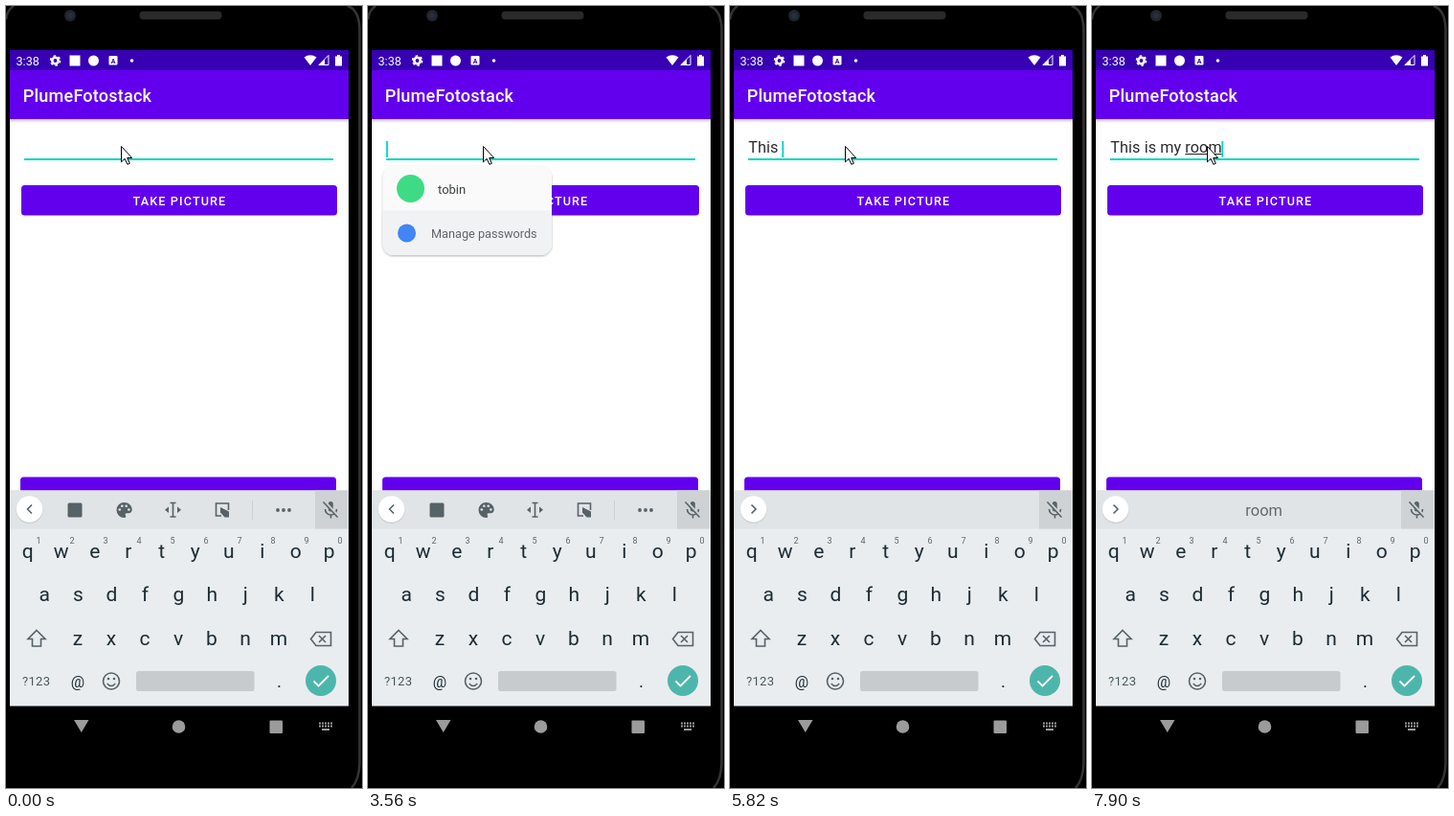
An HTML page for the animation above (8 s loop, 372 by 816 pixels).

```html
<!DOCTYPE html>
<html lang="en">
<head>
<meta charset="utf-8">
<title>Phone typing</title>
<style>
html, body { margin: 0; height: 100%; overflow: hidden; background: #000 }
svg { display: block; width: 372px; height: 816px; font-family: Roboto, sans-serif }
text { white-space: pre }
.mid text, text.mid { text-anchor: middle }
.line { fill: none; stroke: #566268; stroke-width: 1.6 }
.button { font-weight: 500; font-size: 12.64px; letter-spacing: 1.13px; fill: #fff }
</style>
</head>
<body>
<svg viewBox="0 0 372 816">
  <defs>
    <linearGradient id="shade" x2="0" y2="1">
      <stop stop-color="#000" stop-opacity=".22"/><stop offset="1" stop-color="#000" stop-opacity="0"/>
    </linearGradient>
    <filter id="soft" x="-10%" y="-10%" width="120%" height="125%">
      <feDropShadow dx="0" dy="1" stdDeviation="1.3" flood-opacity=".3"/>
    </filter>
  </defs>

  <!-- phone body -->
  <rect width="372" height="816"/>
  <path d="M357 0Q369 4 369.500 24V790Q369 808 361 816M8 0Q1 4 0 14" fill="none" stroke="#343436" stroke-width="2.500"/>
  <circle cx="67" cy="10" r="6" fill="#252527"/>
  <circle cx="67" cy="10" r="3" fill="#20304a"/>
  <rect x="139.500" y="5.500" width="86" height="8.500" rx="4" fill="#2a2a2a"/>

  <!-- app -->
  <rect x="4" y="46" width="354" height="684" fill="#fff"/>
  <rect x="4" y="118" width="354" height="4" fill="url(#shade)"/>
  <rect x="4" y="46" width="354" height="21.500" fill="#3700b3"/>
  <rect x="4" y="67" width="354" height="51" fill="#6200ee"/>
  <g fill="#fff">
    <text x="10.500" y="61.500" font-size="12.600">3:38</text>
    <circle cx="51.500" cy="57" r="3.200" fill="none" stroke="#fff" stroke-width="2.600"/>
    <circle cx="51.500" cy="57" r="5" fill="none" stroke="#fff" stroke-width="1.600" stroke-dasharray="2.500 2.736"/>
    <rect x="66.500" y="51.500" width="11" height="11"/>
    <circle cx="91.500" cy="57" r="5.500"/>
    <rect x="107.500" y="52" width="9" height="9.500" rx="1"/>
    <text class="mid" x="112" y="59.500" font-size="7" font-weight="700" fill="#3700b3">A</text>
    <circle cx="131.500" cy="57" r="1.800"/>
    <path d="M311.500 53.500Q318 49 324.500 53.500L318 62z"/>
    <path d="M327 61.500L337 51.500V61.500z" fill="none" stroke="#fff"/>
    <path d="M326.500 62L333 55.500V62z"/>
    <path d="M344 52.500h2v-1.500h3v1.500h2v10h-7z"/>
    <text x="17.800" y="100" font-size="18.060" font-weight="500" letter-spacing=".2">PlumeFotostack</text>
  </g>
  <rect x="19" y="159" width="323" height="2" fill="#03d5c3"/>
  <text id="field" x="19.300" y="153" font-size="16.200" letter-spacing=".09" fill="#2b2b2b"></text>
  <rect id="under" y="154" height="1.100" fill="#2b2b2b"/>
  <rect id="caret" y="141" width="1.800" height="17" fill="#03d5c3"/>
  <rect x="16" y="187" width="330" height="31.500" rx="3.500" fill="#6200ee"/>
  <text class="button mid" x="181.500" y="208">TAKE PICTURE</text>
  <rect x="15" y="491.500" width="330" height="31" rx="3.500" fill="#6200ee"/>

  <!-- autofill popup -->
  <g id="popup">
    <g filter="url(#soft)">
      <rect x="15.500" y="167" width="176.500" height="93" rx="12" fill="#fafafa"/>
      <path d="M15.500 213.500H192V248a12 12 0 0 1-12 12H27.500a12 12 0 0 1-12-12z" fill="#f1f2f4"/>
    </g>
    <circle cx="44.500" cy="190.500" r="14.500" fill="#3ddc84"/>
    <circle cx="40.500" cy="237" r="9.500" fill="#4285f4"/>
    <text x="73" y="195.500" font-size="13" fill="#3c4043">tobin</text>
    <text x="66" y="241.800" font-size="12.700" fill="#5f6368">Manage passwords</text>
  </g>

  <!-- keyboard -->
  <rect x="4" y="505.500" width="354" height="225" fill="#e9edf0"/>
  <rect x="4" y="505.500" width="354" height="40" fill="#e0e4e6"/>
  <rect x="323" y="505.500" width="34" height="40" fill="#ced2d4"/>
  <circle cx="24.500" cy="526" r="14" fill="#000" opacity=".1"/>
  <circle cx="24.500" cy="525" r="13.700" fill="#fff"/>
  <path id="chevron" class="line" d="M27 520.500l-4.500 4.500 4.500 4.500"/>
  <g id="tools" fill="#566268">
    <rect x="64.500" y="518.500" width="15" height="15" rx="1.500"/>
    <path d="M123.500 518a8 8 0 0 0 0 16c2 0 2-1.500 1.300-2.600-.6-1.200 0-2.200 1.400-2.200h2c2.200 0 3.500-1.600 3.500-3.700 0-4.200-3.700-7.500-8.200-7.500z"/>
    <g fill="#e0e4e6">
      <circle cx="118.800" cy="525.500" r="1.300"/><circle cx="121.300" cy="521.800" r="1.300"/>
      <circle cx="125.700" cy="521.800" r="1.300"/><circle cx="128.300" cy="525.500" r="1.300"/>
    </g>
    <path class="line" d="M171.500 518.500h6M171.500 533h6M174.500 518.500v14.500"/>
    <path d="M170 522.500v6.500l-4-3.250zM179 522.500v6.500l4-3.250z"/>
    <path class="line" d="M225 532h-5.500v-13H232.500v7"/>
    <path d="M224 523l9 4.500v6h-4.500l-4.500-5z"/>
    <rect x="257" y="516" width="1" height="20" fill="#ccd0d3"/>
    <circle cx="284" cy="526" r="1.900"/><circle cx="290" cy="526" r="1.900"/><circle cx="296" cy="526" r="1.900"/>
  </g>
  <text id="hint" class="mid" x="179.700" y="532" font-size="16.500" fill="#62696d"></text>
  <rect x="336.800" y="517" width="5" height="10.500" rx="2.500" fill="#566268"/>
  <path class="line" d="M333.500 525a6 6 0 0 0 12 0M339.500 531v3.500"/>
  <path d="M332.500 517l15 16" stroke="#ced2d4" stroke-width="3"/>
  <path class="line" d="M331.500 517.500l15 16"/>
  <g id="keys" class="mid" font-size="21" fill="#1c2c34"></g>
  <path class="line" d="M32 651.500l9 9h-4.500v7.500h-9v-7.500H23z"/>
  <path class="line" d="M324 653.500h15.500v14H324l-5.500-7zM327 657l7 7M334 657l-7 7"/>
  <text x="17" y="709" font-size="13" letter-spacing=".3" fill="#48565d">?123</text>
  <text class="mid" x="75" y="710.500" font-size="16" fill="#1c2c34">@</text>
  <circle class="line" cx="110" cy="704.500" r="8.500"/>
  <path class="line" d="M105.800 707q4.200 5 8.400 0"/>
  <circle cx="107" cy="702" r="1.300" fill="#566268"/><circle cx="113" cy="702" r="1.300" fill="#566268"/>
  <rect x="136" y="694" width="123.500" height="21" rx="2.500" fill="#c8cbce"/>
  <text class="mid" x="285.500" y="710.500" font-size="19" fill="#1c2c34">.</text>
  <circle cx="329" cy="704" r="16" fill="#4db6ac"/>
  <path d="M321.500 704.500l5 5 10.500-10.500" fill="none" stroke="#fff" stroke-width="1.800"/>

  <!-- navigation -->
  <g fill="#9b9b9b">
    <path d="M71 745h15.500l-7.750 13z"/>
    <circle cx="180.500" cy="752" r="6.800"/>
    <rect x="275.500" y="745.500" width="13.500" height="13.500" rx="1"/>
    <path d="M327 748.500h14M327 751.500h14" stroke="#9b9b9b" stroke-width="2" stroke-dasharray="2 1"/>
    <rect x="330" y="754" width="8" height="2"/>
  </g>

  <path d="M120.500 146.500v16.300l3.700-3.500 2.700 6 2.400-1-2.600-5.800h5z" fill="#fff" stroke="#000"/>
</svg>
<script>
const $ = id => document.getElementById(id);
const LOOP = 8000;
const BLINKS = [0, 670, 1100, 1520, 2050, 2620, 3050, 3440];
// time, text, toolbar shown
const TYPING = [
  [0, '', true], [4700, 'T'], [4820, 'Th'], [5320, 'Thi'], [5570, 'This'], [5820, 'This '],
  [5970, 'This ', true], [6090, 'This i'], [6210, 'This is'], [6330, 'This is '],
  [6450, 'This is ', true], [6880, 'This is m'], [7130, 'This is my'], [7250, 'This is my '],
  [7370, 'This is my ', true], [7510, 'This is my r'], [7630, 'This is my ro'],
  [7750, 'This is my roo'], [7900, 'This is my room']
];
// time, opacity, scale
const POPUP = [[0, 0, 1], [3440, .5, .96], [3560, 1, 1], [4700, .08, .91], [4820, 0, 1]];

const keyText = (x, y, s, extra = '') => `<text x="${x}" y="${y}" ${extra}>${s}</text>`;
const row = (letters, x, y) => [...letters].map((c, i) => keyText(x + i * 35, y, c)).join('');
$('keys').innerHTML = row('qwertyuiop', 22.7, 575.5) + row('asdfghjkl', 40.3, 621) + row('zxcvbnm', 75, 666.5) +
  [...'1234567890'].map((c, i) => keyText(34 + i * 35, 561, c, 'font-size="9" fill="#59666d"')).join('');

const at = (list, t) => list.findLast(s => s[0] <= t);
const show = (id, on) => $(id).setAttribute('visibility', on ? 'visible' : 'hidden');

function draw(t) {
  const [, text, tools] = at(TYPING, t);
  const word = text.split(' ').pop();
  const field = $('field');
  field.textContent = text;
  $('hint').textContent = word;
  const end = text ? field.getComputedTextLength() : 0;
  const wide = word ? field.getSubStringLength(text.length - word.length, word.length) : 0;
  $('under').setAttribute('x', 19.3 + end - wide);
  $('under').setAttribute('width', wide);
  $('caret').setAttribute('x', 19 + end);
  show('caret', BLINKS.filter(b => b <= t).length % 2 === 0);
  show('tools', tools);
  $('chevron').setAttribute('transform', tools ? '' : 'matrix(-1 0 0 1 49.5 0)');

  const [, alpha, scale] = at(POPUP, t);
  $('popup').setAttribute('opacity', alpha);
  $('popup').setAttribute('transform', `translate(103 214) scale(${scale}) translate(-103 -214)`);
}

const start = performance.now();
function tick(now) {
  draw(Math.max(0, now - start) % LOOP);
  requestAnimationFrame(tick);
}
draw(0);
requestAnimationFrame(tick);
</script>
</body>
</html>
```
